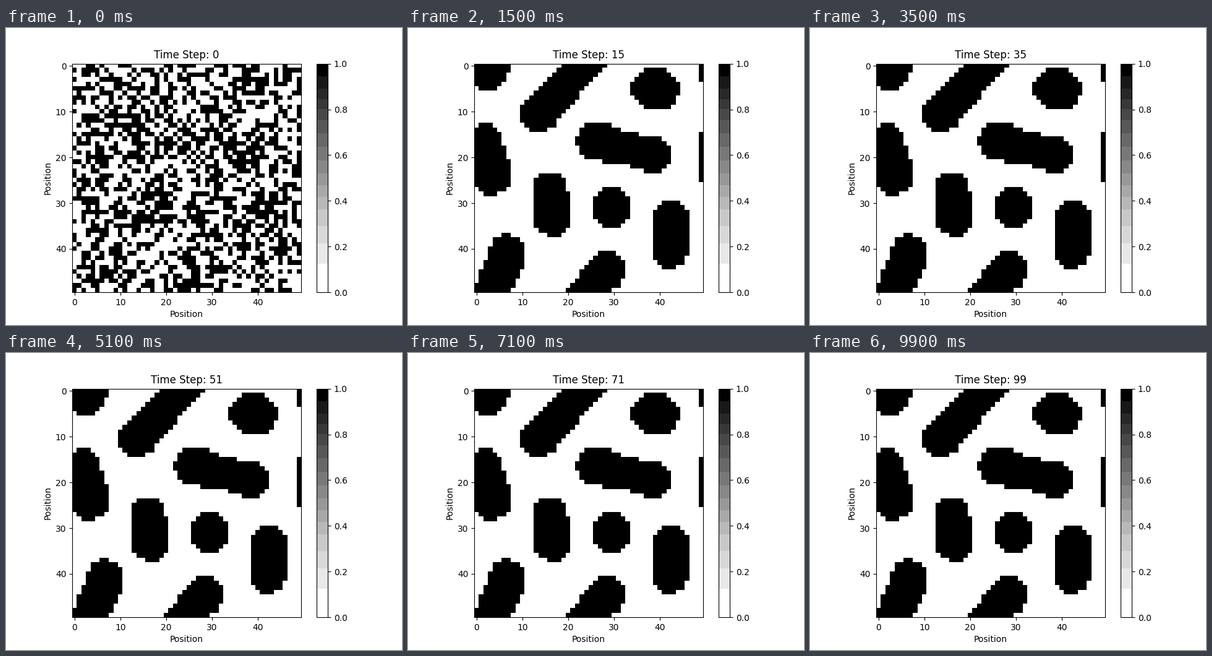
Recreate the animation shown at these times as a matplotlib script. Size 640 by 480 pixels, loop 10000 ms.

```python
import matplotlib.pyplot as plt
import numpy as np
from matplotlib.animation import FuncAnimation
from matplotlib.colors import ListedColormap

SIZE = 50
STEPS = 100
SETTLED = 10

rows, cols = np.mgrid[:SIZE, :SIZE]


def wrap(d):
    """Shortest signed distance on the periodic grid."""
    return (d + SIZE / 2) % SIZE - SIZE / 2


def blob(start, end, neck=0):
    """Depth inside a disc (x, y, r) swept from start to end."""
    depth = np.full((SIZE, SIZE), -np.inf)
    for t in np.linspace(0, 1, 60):
        x, y, r = (1 - t) * np.array(start) + t * np.array(end)
        r -= neck * 4 * t * (1 - t)
        depth = np.maximum(depth, r - np.hypot(wrap(cols - x), wrap(rows - y)))
    return depth


def blur(field, sigma):
    """Gaussian blur with periodic edges."""
    f = np.fft.fftfreq(SIZE)
    kernel = np.exp(-2 * (np.pi * sigma) ** 2 * (f[:, None] ** 2 + f ** 2))
    return np.fft.ifft2(np.fft.fft2(field) * kernel).real


depth = np.max([
    blob((29.5, 31, 4.45), (29.5, 31, 4.45)),
    blob((38.4, 5, 4.52), (39.8, 5.2, 4.52)),
    blob((42.5, 33.8, 4.09), (42.15, 40.1, 4.09)),
    blob((16, 27.2, 3.8), (16.6, 33, 4.3)),
    blob((1.9, 16.5, 3.8), (3.1, 23.6, 4.6)),
    blob((26.3, 16.5, 4.4), (38.5, 19.5, 3.85), neck=0.5),
    blob((6.8, 41.1, 4.2), (2.6, 51.2, 4.2), neck=0.3),
    blob((28.4, 44.8, 4.15), (13.8, 60.4, 4.2), neck=0.5),
], axis=0)

# Random start, slightly denser where the pattern will form
rng = np.random.default_rng(7)
chance = np.where(depth > 0, 0.57, 0.43)
noise = (rng.random((SIZE, SIZE)) < chance).astype(float)
ripple = blur(noise - chance, 2)
ripple /= ripple.std()


def state(step):
    """Noise, then blobs whose ragged edges calm down and stay."""
    if step == 0:
        return noise
    wobble = 1.5 * 0.65 ** (step - 1) if step < SETTLED else 0
    return (depth + wobble * ripple > 0).astype(float)


def banded_greys():
    """The Greys map in 16 brightness levels, ending in pure white and black."""
    level = plt.get_cmap("Greys")(np.linspace(0, 1, 256))[:, 0] * 255 // 16
    grey = (level * 16 + 8) / 255
    grey[level == 15] = 1
    grey[level == 0] = 0
    return ListedColormap(np.column_stack([grey] * 3))


fig, ax = plt.subplots(figsize=(6.4, 4.8), dpi=100)
image = ax.imshow(noise, cmap=banded_greys(), vmin=0, vmax=1,
                  interpolation="nearest")
fig.colorbar(image)
ax.set_xlabel("Position")
ax.set_ylabel("Position")
title = ax.set_title("Time Step: 0")


def update(step):
    image.set_data(state(step))
    title.set_text(f"Time Step: {step}")
    return image, title


anim = FuncAnimation(fig, update, frames=STEPS, interval=100, repeat=True)
plt.show()
```
